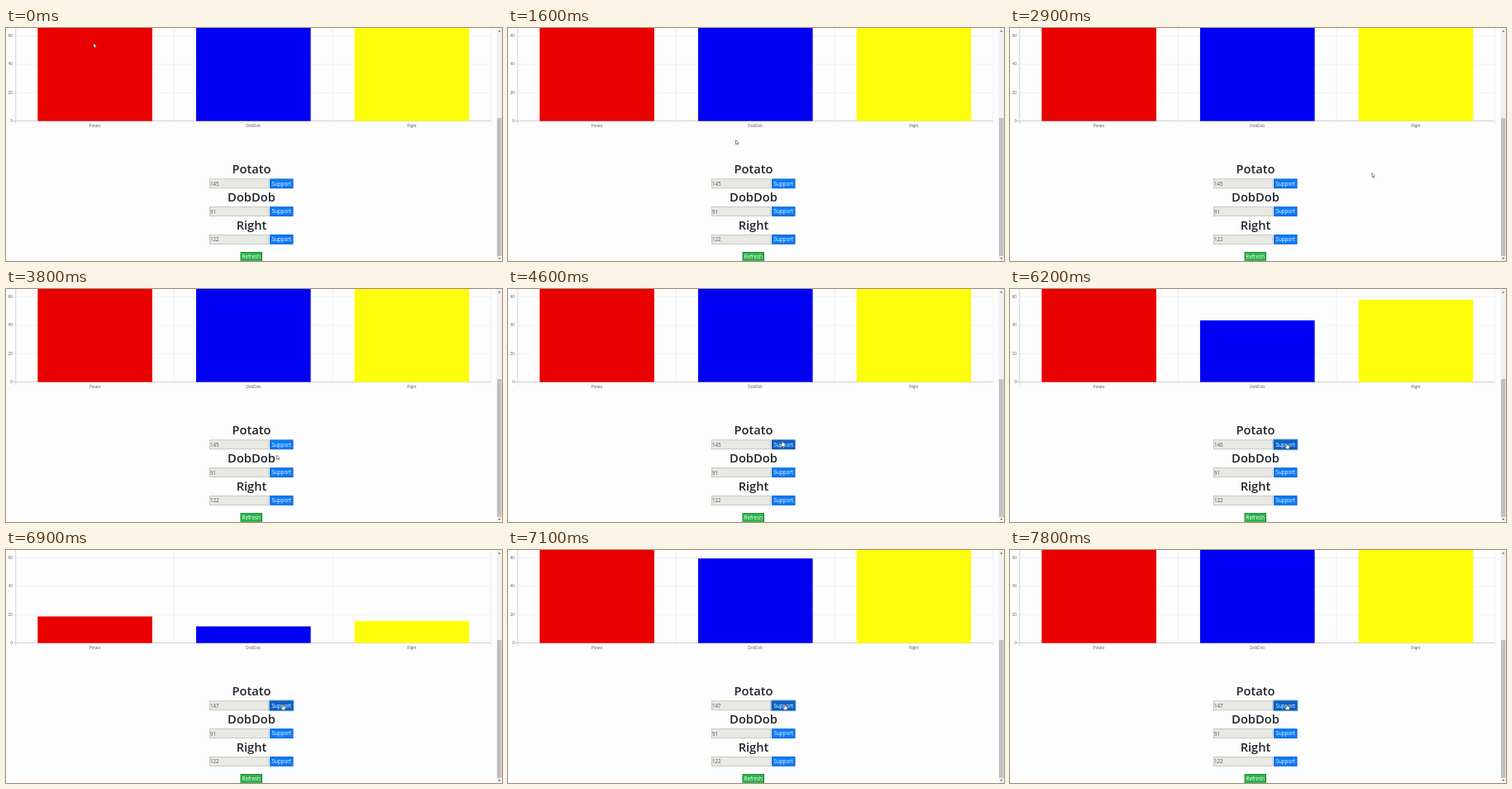
These frames come from a looping animation (600 px wide and 282 px high, 8 s). An HTML page with a canvas:

```html
<!DOCTYPE html>
<html lang="en">
<head>
<meta charset="utf-8">
<title>Vote chart</title>
<style>
html, body { margin: 0; width: 100%; height: 100%; overflow: hidden; background: #fdfdfd; }
canvas { display: block; width: 600px; height: 282px; }
</style>
</head>
<body>
<canvas id="stage" width="600" height="282"></canvas>
<script>
const ctx = document.getElementById('stage').getContext('2d');
const LOOP = 8000, BASE = 112, UNIT = 1.71;
const LEFT = 11.8, STEP = 191.67, BAR = 138.6;
const ROW_TOP = 182.4, ROW_GAP = 33.8, BOX_H = 11.8;
const CLICKS = [5700, 6500], RELOADS = [6051, 6867];
const UI = '"Open Sans", "Noto Sans", sans-serif';
const SMALL = '4.8px "Liberation Sans", Arial, sans-serif';

const rows = [
  { name: 'Potato', color: '#e90000', votes: 145 },
  { name: 'DobDob', color: '#0000f3', votes: 91 },
  { name: 'Right', color: '#fdfd0b', votes: 122 }
];

// Pointer turns before it reaches the buttons: time, x, y
const SWEEP = 3900;
const turns = [
  [0, 106, 18.5], [950, 305, 272], [1600, 275.5, 135.5], [1800, 258, 190],
  [2100, 290, 272], [2600, 437.8, 175.3], [2900, 437.8, 175.3],
  [3150, 464, 191], [3700, 326, 221], [SWEEP, 329, 181]
];

function rect(x, y, w, h, color) {
  ctx.fillStyle = color;
  ctx.fillRect(x, y, w, h);
}

function text(str, x, y, font, color, align = 'center') {
  ctx.font = font;
  ctx.fillStyle = color;
  ctx.textAlign = align;
  ctx.fillText(str, x, y);
}

function shape(path, fill, stroke) {
  const p = new Path2D(path);
  ctx.fillStyle = fill;
  ctx.fill(p);
  if (stroke) {
    ctx.strokeStyle = stroke;
    ctx.lineWidth = 0.6;
    ctx.stroke(p);
  }
}

function pointerAt(t) {
  if (t >= SWEEP) {
    // Two swings down the button column, then rest on the first
    const k = Math.min(1, (t - SWEEP) / 700 - 1);
    return { x: 332 + 3 * k, y: 184 + 3 * k + 33 * (1 - Math.cos(2 * Math.PI * k)) };
  }
  const i = turns.findIndex(s => s[0] > t);
  const [t0, x0, y0] = turns[i - 1], [t1, x1, y1] = turns[i];
  const k = (t - t0) / (t1 - t0), e = k * k * (3 - 2 * k);
  return { x: x0 + (x1 - x0) * e, y: y0 + (y1 - y0) * e };
}

const inside = (p, x, y, w, h) => p.x >= x && p.x <= x + w && p.y >= y && p.y <= y + h;

const votesAt = (i, t) => rows[i].votes + (i ? 0 : CLICKS.filter(c => t >= c).length);

// Bars regrow with a quartic ease-out after each reload
function growth(t) {
  const start = Math.max(-1000, ...RELOADS.filter(r => t >= r));
  const p = Math.min(1, (t - start) / 1000);
  return 1 - (1 - p) ** 4;
}

function drawChart(t) {
  for (let v = 0; v <= 60; v += 20) {
    const y = BASE - v * UNIT;
    rect(8, y, 579, 0.7, v ? '#ececec' : '#bcbcbc');
    text(v, 8, y + 1.7, SMALL, '#666', 'right');
  }
  for (let i = 0; i <= 3; i++) rect(LEFT + i * STEP - 0.4, 0, 0.8, 116, i ? '#ececec' : '#c8c8c8');

  const k = growth(t);
  rows.forEach((row, i) => {
    const mid = LEFT + (i + 0.5) * STEP, h = votesAt(i, t) * UNIT * k;
    rect(mid - BAR / 2, BASE - h, BAR, h + 0.6, row.color);
    text(row.name, mid - 0.2, 119.8, SMALL, '#666');
  });
}

function button(label, x, y, w, fill, edge) {
  rect(x, y, w, BOX_H, edge);
  rect(x + 0.6, y + 0.6, w - 1.4, BOX_H - 1.4, fill);
  text(label, x + w / 2, y + BOX_H / 2 + 2.3, '6.3px ' + UI, '#fff');
}

function drawForm(t, p) {
  let hand = false;
  rows.forEach((row, i) => {
    const y = ROW_TOP + i * ROW_GAP, over = inside(p, 319, y, 28.5, BOX_H);
    hand = hand || over;
    text(row.name, 297, y - 6.2, '600 14.7px ' + UI, '#212529');
    rect(246, y, 72, BOX_H, '#b9b9b4');
    rect(246.7, y + 0.7, 70.6, BOX_H - 1.4, '#e9e9e3');
    text(votesAt(i, t), 247, y + 8.4, '6.2px ' + UI, '#555', 'left');
    if (!i && t >= CLICKS[0]) rect(318, y - 1, 30.5, BOX_H + 2, '#8dbcf2');
    button('Support', 319, y, 28.5, over ? '#0864cb' : '#0a7bf8', over ? '#084a94' : '#0a5cb8');
  });
  const over = inside(p, 283.5, 271, 26.5, BOX_H);
  button('Refresh', 283.5, 271, 26.5, over ? '#218838' : '#2fb34c', '#1f7a35');
  return hand || over;
}

function drawScrollbar() {
  rect(593.5, 0, 6.5, 282, '#f1f1f1');
  rect(594, 109, 5.5, 167, '#c1c1c1');
  shape('M595.3 4.5h3l-1.5-1.8z', '#505050');
  shape('M595.3 278h3l-1.5 1.8z', '#505050');
}

function drawPointer(p, hand) {
  const path = hand
    ? 'M-.7 0H.6V2L3 2.6V5L2.3 6.6H-.8L-2.3 4l.7-.8.9.8z'
    : 'M0 0V5.2L1.2 4.2 2 6l.9-.4-.8-1.7 1.6-.2z';
  ctx.save();
  ctx.translate(p.x, p.y);
  shape(path, '#fff', '#444');
  ctx.restore();
}

function draw(now) {
  const t = Math.floor(now % LOOP / 100) * 100; // ten updates a second
  const p = pointerAt(t);
  rect(0, 0, 600, 282, '#fdfdfd');
  drawChart(t);
  const hand = drawForm(t, p);
  drawScrollbar();
  drawPointer(p, hand);
}

let begin;
function tick(now) {
  begin ??= now;
  draw(now - begin);
  requestAnimationFrame(tick);
}
draw(0);
requestAnimationFrame(tick);
</script>
</body>
</html>
```
